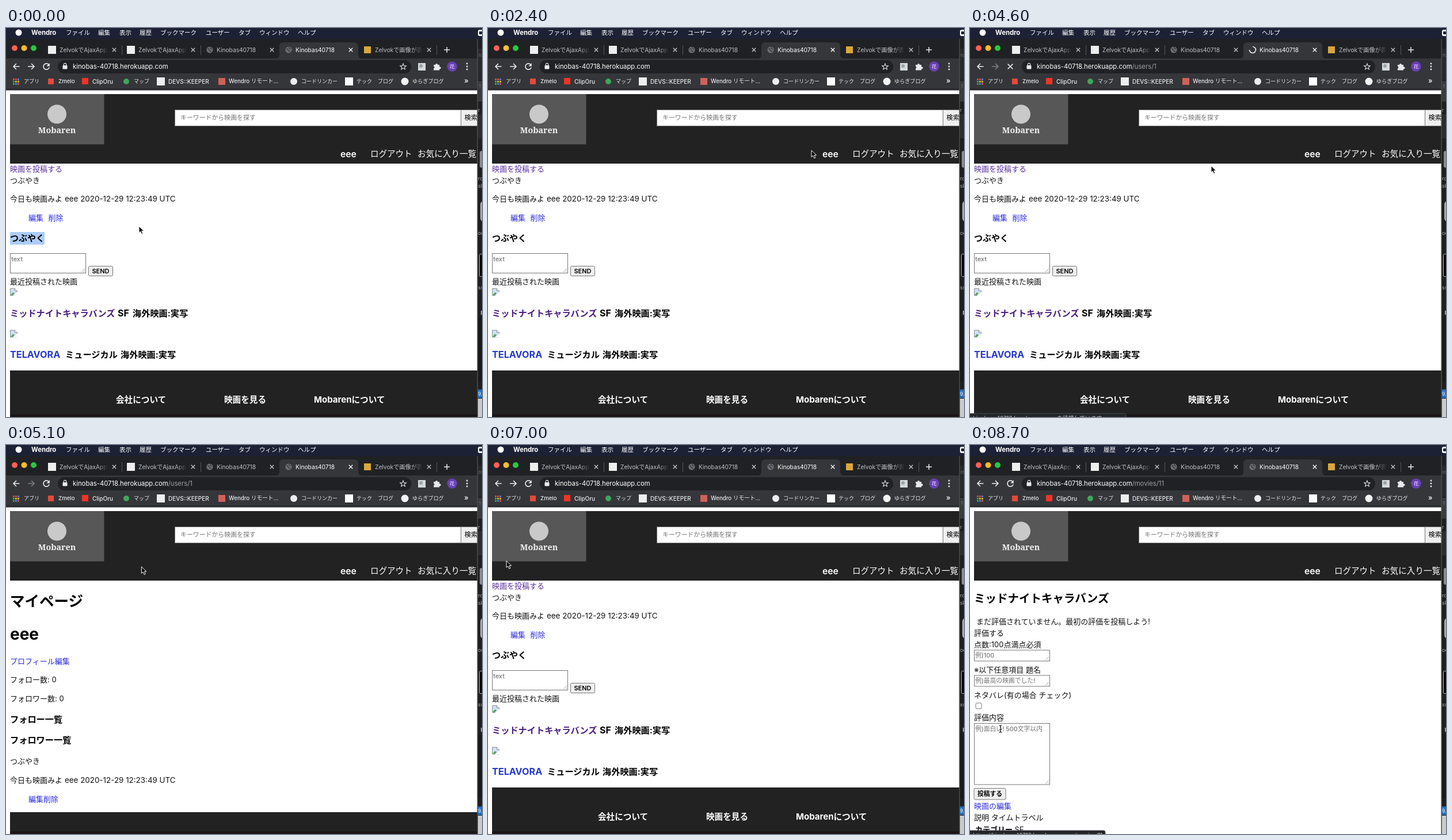
Recreate the animation shown at these times as an HTML page. Size 827 px wide and 677 px high, loop 8.8 s.

```html
<!DOCTYPE html>
<html lang="ja">
<head>
<meta charset="utf-8">
<title>Movie site</title>
<style>
html, body { margin: 0; width: 100%; height: 100%; overflow: hidden; background: #202124; }
svg { display: block; width: 827px; height: 677px; }
text { font-family: Inter, "Noto Sans CJK JP", "Noto Sans CJK", sans-serif; white-space: pre; }
.serif { font-family: "Noto Serif", serif; }
</style>
</head>
<body>
<svg id="stage" viewBox="0 0 827 677"></svg>
<script>
const LOOP = 8800, STEP = 100;
const BLUE = '#2b2bdc', PURPLE = '#5b2d9e', HEADING = '#4a1c80', BAR = '#222', GREY = '#757575';
const HOST = 'kinobas-40718.herokuapp.com';
const USER = 'eee', SITE = 'Mobaren', TAB = 'Kinobas40718', FILM = 'ミッドナイトキャラバンズ';

// cy is the optical middle of the line
const text = (x, cy, s, size = 13, fill = '#111', weight = 400, extra = '') =>
  `<text x="${x}" y="${(cy + size * .36).toFixed(2)}" font-size="${size}" fill="${fill}" font-weight="${weight}" ${extra}>${s}</text>`;
const bold = (x, cy, s, size = 15.2, fill = '#000') => text(x, cy, s, size, fill, 700);
const rect = (x, y, w, h, fill, extra = '') =>
  `<rect x="${x}" y="${y}" width="${w}" height="${h}" fill="${fill}" ${extra}/>`;
const circle = (x, y, r, fill, extra = '') => `<circle cx="${x}" cy="${y}" r="${r}" fill="${fill}" ${extra}/>`;
const line = (d, stroke, w = 1, extra = '') => `<path d="${d}" fill="none" stroke="${stroke}" stroke-width="${w}" ${extra}/>`;
const group = (id, body, extra = '') => `<g id="${id}" ${extra}>${body}</g>`;
const cross = (x, y, r, color, w = 1.3) =>
  line(`M${x - r} ${y - r}l${2 * r} ${2 * r}M${x + r} ${y - r}l${-2 * r} ${2 * r}`, color, w);
const box = (x, y, w, h, fill = '#fff', r = 0) =>
  rect(x + .5, y + .5, w - 1, h - 1, fill, `stroke="#767676" rx="${r}"`);
const textarea = (y, h, hint, size = 10.8) =>
  box(7, y, 132, h) + text(9, y + 10, hint, size, GREY, 500) +
  line(`M131 ${y + h - 2}l6 -6M135 ${y + h - 2}l2 -2`, '#888', .8);
const button = (x, y, w, h, label, size) => box(x, y, w, h, '#efefef', 2) +
  text(x + w / 2, y + h / 2, label, size, '#000', 600, 'text-anchor="middle"');

function menuBar() {
  const items = [[104, 'ファイル'], [160, '編集'], [197, '表示'], [232, '履歴'], [268, 'ブックマーク'],
    [347, 'ユーザー'], [404, 'タブ'], [440, 'ウィンドウ'], [507, 'ヘルプ']];
  return rect(0, 0, 827, 19, '#1c2136') + circle(22, 8, 5.5, '#fff') + bold(44, 8, 'Wendro', 11.3, '#fff') +
    items.map(([x, s]) => text(x, 8, s, 10.5, '#fff', 500)).join('') +
    rect(820, 3, 10, 11, '#fff', 'rx="3"') + rect(822, 6, 8, 5, '#1c2136', 'rx="1"');
}

function globe(x, y) {
  return circle(x, y, 5.6, '#6d7075') + line(`M${x - 4} ${y - 2}q3 0 3 2t4 3M${x + 1} ${y - 5}q-1 3 3 4`, '#35363a', 1.4);
}

function tabs() {
  const fade = (x, id) => rect(x, 28, 22, 20, `url(#${id})`);
  const title = (x, s) => text(x, 38, s, 10.2, '#bdc1c6');
  return rect(0, 18, 819, 36, '#202124') +
    ['#ff5f57', '#febc2e', '#28c840'].map((c, i) => circle(15 + i * 16.5, 35, 5, c)).join('') +
    '<path d="M469 53q6 0 6 -7v-14q0 -7 7 -7h123q7 0 7 7v14q0 7 6 7z" fill="#35363a"/>' +
    [73, 210].map(x => rect(x, 31, 14, 14, '#eee') + title(x + 20, 'ZelvokでAjaxApp') + fade(x + 85, 'fadeTab')).join('') +
    globe(354, 38) + title(366, TAB) + text(503, 38, TAB, 10.2, '#fff') +
    rect(622, 32, 12, 12, '#d9a83c') + title(641, 'Zelvokで画像が表示') + rect(726, 28, 20, 20, '#202124') + fade(704, 'fadeTab') +
    [188, 325, 462, 599, 735].map(x => cross(x, 38, 3.2, x === 599 ? '#fff' : '#c4c7cb')).join('') +
    [201, 338, 748].map(x => rect(x, 30, 1, 17, '#55575b')).join('') +
    line('M766 33v10M761 38h10', '#e8eaed', 1.5) +
    group('globe', globe(491, 38)) +
    group('spinner', line('M491 32.5A5.5 5.5 0 1 1 485.5 38', '#e8eaed', 1.7));
}

function toolbar() {
  const star = Array.from({ length: 10 }, (_, i) => {
    const r = i % 2 ? 2.4 : 5.6, a = i * Math.PI / 5;
    return `${(690 + r * Math.sin(a)).toFixed(1)},${(67.5 - r * Math.cos(a)).toFixed(1)}`;
  }).join(' ');
  return rect(0, 53, 819, 55, '#35363a') + rect(0, 105, 819, 3.5, '#2a2b2e') +
    line('M23.5 67H13M18 62l-5 5l5 5', '#e8eaed', 1.6) +
    group('forward', line('M38 67h10.5M44 62l5 5l-5 5', 'currentColor', 1.6)) +
    group('reload', line('M74 63.5A5.2 5.2 0 1 0 75.2 68.5', '#e8eaed', 1.6) + '<path d="M75.8 61v5.5h-5.5z" fill="#e8eaed"/>') +
    group('stop', cross(70, 67, 4.4, '#e8eaed', 1.5)) +
    rect(90, 56, 614, 23, '#202124', 'rx="11.5"') +
    rect(98.5, 65, 8, 6.5, '#e8eaed', 'rx="1"') + line('M100.3 65v-1.5a2.2 2.2 0 0 1 4.4 0v1.5', '#e8eaed', 1.2) +
    text(116, 67, `${HOST}<tspan id="path" fill="#9aa0a6"></tspan>`, 11.3, '#fff') +
    `<polygon points="${star}" fill="none" stroke="#dadce0" stroke-width="1.1"/>` +
    rect(716, 61, 13, 13, '#d5d9da') + circle(721, 66, 3, '#9aa3a6') +
    '<path d="M743 64h3a2 2 0 1 1 4 0h3v3.5a2 2 0 1 1 0 3.8v2.2h-10v-3a2 2 0 0 0 0 -3.8z" fill="#e8eaed"/>' +
    circle(775, 67, 8.7, '#6b3fb8') + text(775, 67, '花', 8.5, '#fff', 400, 'text-anchor="middle"') +
    [62, 67, 72].map(y => circle(801, y, 1.4, '#e8eaed')).join('');
}

function bookmarks() {
  const dots = ['#e8503f', '#e8503f', '#4a8af4', '#45a85a', '#f2b92c', '#f2b92c', '#45a85a', '#4a8af4', '#e8503f'];
  const labels = [[31, 'アプリ', 9], [91, 'Zmelo', 9.6], [150, 'ClipOru', 10], [222, 'マップ', 9],
    [282, 'DEVS::KEEPER', 10], [387, 'Wendro リモート...', 9.7], [513, 'コードリンカー', 9],
    [609, 'テック', 9], [646, 'ブログ', 9], [706, 'ゆらぎブログ', 9.1]];
  return rect(9, 83, 54, 20, '#46474b', 'id="appsHover" rx="10"') +
    dots.map((c, i) => rect(12 + i % 3 * 4, 88 + Math.floor(i / 3) * 4, 2.8, 2.8, c)).join('') +
    rect(73, 88, 10, 10, '#e5493c') + rect(132, 87, 11, 11, '#f03327') + circle(209, 93, 5, '#3fa65a') +
    rect(262, 86, 14, 14, '#eee') + rect(369, 87, 12, 12, '#cf6258') + circle(500, 93, 6, '#eceef0') +
    rect(589, 86, 14, 14, '#fff') + circle(693, 93, 6.5, '#f3f3f3') +
    labels.map(([x, s, size]) => text(x, 93, s, size, '#e8eaed', 500)).join('') +
    text(796, 92, '»', 12, '#e8eaed', 600);
}

function header() {
  return rect(7, 115, 812, 121, BAR) + rect(7, 115, 163.5, 87.5, '#575757') +
    circle(88.5, 150, 16.5, '#c9c9c9') +
    text(88.5, 177.5, SITE, 14.3, '#f2f2f2', 700, 'class="serif" text-anchor="middle"') +
    box(293, 142, 498, 29) + text(303, 156, 'キーワードから映画を探す', 10.9, GREY) +
    box(790, 142, 45, 29, '#efefef') + text(796.5, 156, '検索', 11.3, '#000', 500) +
    text(581, 219, USER, 15.7, '#fff', 600) + text(633, 218.5, 'ログアウト', 14.5, '#fff') +
    text(715, 218.5, 'お気に入り一覧', 14.6, '#fff');
}

const footer = y => rect(7, y, 812, 677 - y, BAR) + rect(7, 672.5, 812, 5, '#1a1517');
const tweet = y => text(7, y, '今日も映画みよ') + text(102, y, `${USER} 2020-12-29 12:23:49 UTC`, 13.4);
const brokenImage = y => `<g transform="translate(7 ${y})">` +
  '<path d="M.5 .5h8l4 4v8h-12z" fill="#cfe0f7" stroke="#8b8b8b"/>' +
  '<path d="M1 12l4 -5l3 2l-3 3z" fill="#4fa657"/><path d="M5 13l8 -7v7z" fill="#fff"/>' +
  '<path d="M8.5 .5v4h4" fill="#fff" stroke="#8b8b8b"/></g>';

function homePage() {
  const genre = (x, y) => bold(x, y, '海外映画:実写');
  return text(7, 245, '映画を投稿する', 13, PURPLE) + text(7, 265, 'つぶやき') + tweet(297.5) +
    text(39, 330, '編集', 13, BLUE) + text(73.5, 330, '削除', 13, BLUE) +
    rect(7, 355, 60, 22, '#accdf8', 'id="selection"') + bold(7, 365.5, 'つぶやく', 15) +
    textarea(392, 35, 'text', 11) + button(143, 414, 43, 18, 'SEND', 11) +
    text(7, 441, '最近投稿された映画') +
    brokenImage(453) + bold(7, 496.5, FILM, 15.2, HEADING) + bold(194, 496.5, 'SF', 16) + genre(220, 496.5) +
    brokenImage(525.5) + bold(7, 568.5, 'TELAVORA', 16.2, '#2439d0') + bold(103, 568.5, 'ミュージカル') + genre(199, 568.5) +
    footer(596) + bold(191, 646.5, '会社について', 14.6, '#fff') + bold(379, 646.5, '映画を見る', 14.6, '#fff') +
    bold(535, 646.5, SITE, 15, '#fff') + bold(600.5, 646.5, 'について', 14.6, '#fff');
}

function userPage() {
  return bold(7, 271.5, 'マイページ', 25.5) + bold(7, 329, USER, 28) +
    text(7, 376, 'プロフィール編集', 13, BLUE) + text(7, 408.5, 'フォロー数: 0') + text(7, 441, 'フォロワー数: 0') +
    bold(7, 477.5, 'フォロー一覧') + bold(7, 514, 'フォロワー一覧') + text(7, 550.5, 'つぶやき') + tweet(583) +
    text(39, 616, '編集削除', 13, BLUE) + footer(639);
}

function moviePage() {
  return bold(7, 266.5, FILM, 19.5) + text(11, 307.5, 'まだ評価されていません。最初の評価を投稿しよう!') +
    text(7, 327, '評価する') + text(7, 347, '点数:100点満点必須') + textarea(356.5, 20, '例)100') +
    text(7, 391, '※以下任意項目 題名') + textarea(400.5, 20, '例)最高の映画でした!') +
    text(7, 435, 'ネタバレ(有の場合 チェック)') + box(9.5, 448.5, 11, 11, '#fff', 2) +
    text(7, 474, '評価内容') + textarea(484, 107.5, '例)面白い! 500文字以内') +
    button(6.5, 597, 56, 20.5, '投稿する', 10.8) + text(7, 628, '映画の編集', 13, BLUE) +
    text(7, 648, '説明 タイムトラベル') + bold(9, 669, 'カテゴリー', 13) + text(77.5, 669, 'SF');
}

// Sliver of the windows behind the browser
function background() {
  const scraps = [[143, 'r'], [262, 'ro'], [275, 'sk'], [357, 'oo'], [452, 'ss']];
  return rect(819, 18, 8, 659, '#1f1f21') + rect(819, 36, 8, 54, '#292a2d') + rect(819, 92, 8, 36, '#3a3b3e') +
    rect(819, 150, 8, 42, '#2d2d30') + rect(819, 503, 8, 112, '#191a1c') +
    text(821, 47, 'ro', 8, '#777') + text(822, 101, '1', 7, '#888') +
    scraps.map(([y, s]) => text(820, y, s, 9, '#a8a8a8')).join('') +
    rect(823, 214, 10, 29, '#8b8b8d', 'rx="3"') + rect(824, 301, 12, 36, '#a9a9ab', 'rx="6"') +
    rect(822.5, 393.5, 10, 39, '#050505', 'stroke="#bbb" rx="2"') + rect(825, 492, 2, 7, '#999') +
    rect(819, 629, 8, 15, '#1f6fc4') + text(820, 637, '9.', 8.5, '#fff') +
    rect(819, 645, 8, 32, '#c9cacc') + rect(818.5, 18, 1.5, 659, '#4b4b4d');
}

const cursors = group('arrow', '<path d="M0 0v11.5l2.7 -2.5l2 4.6l2.1 -.9l-2 -4.5h3.7z" fill="#000" stroke="#fff" stroke-width="1"/>') +
  group('hand', '<path d="M-1 0q1.3 -1.2 2.2 .3v4.3q1.5 -.9 2.2 .4q1.5 -.7 2.1 .5q1.8 -.5 1.8 1.3v3.2l-1.5 3.5h-6l-4 -5.3q-.3 -1.7 1.5 -1l1.7 1.5z" fill="#fff" stroke="#111" stroke-width="1.1"/>' +
    line('M1.7 8v3M3.7 8v3', '#111', .8)) +
  group('beam', line('M-2.5 -6q2.5 0 2.5 1.5v9q0 1.5 -2.5 1.5M2.5 -6q-2.5 0 -2.5 1.5M2.5 6q-2.5 0 -2.5 -1.5M-1.5 1.5h3', '#111', 1.2));

const stage = document.getElementById('stage');
stage.innerHTML =
  '<defs><linearGradient id="fadeTab"><stop stop-color="#202124" stop-opacity="0"/><stop offset=".9" stop-color="#202124"/></linearGradient>' +
  '<clipPath id="window"><rect y="18" width="819" height="659"/></clipPath></defs>' +
  '<g clip-path="url(#window)">' + rect(0, 108, 819, 569, '#fff') + header() +
  group('home', homePage()) + group('user', userPage()) + group('movie', moviePage()) +
  tabs() + toolbar() + bookmarks() + '</g>' + background() + menuBar() +
  group('status', rect(-4, 671, 239, 20, '#232427', 'id="statusBox" rx="3" stroke="#4b4c50"') +
    text(5, 679.5, '<tspan id="statusText"></tspan>', 9.8, '#c8cacd')) +
  group('cursor', cursors);

const $ = id => document.getElementById(id);
const show = (id, on) => { $(id).style.display = on ? '' : 'none'; };
const within = (t, from, to) => t >= from && t < to;

// Pointer stops: time, x, y
const route = [[0, 231, 345], [600, 199, 335], [1400, 199, 335], [2400, 562, 213], [2800, 592, 220],
  [4200, 592, 220], [4600, 419, 240], [5300, 190, 205], [6100, 53, 51], [6400, 19, 65],
  [6700, 19, 65], [7500, 60, 497], [8300, 60, 497], [8700, 53, 494]];

function pointer(t) {
  const i = route.findIndex(stop => stop[0] > t);
  if (i < 0) return route[route.length - 1].slice(1);
  const [t0, x0, y0] = route[i - 1], [t1, x1, y1] = route[i];
  const u = (t - t0) / (t1 - t0), e = u * u * (3 - 2 * u);
  return [x0 + (x1 - x0) * e, y0 + (y1 - y0) * e];
}

function draw(t) {
  const page = within(t, 4900, 6600) ? 'user' : t >= 8500 ? 'movie' : 'home';
  ['home', 'user', 'movie'].forEach(id => show(id, id === page));
  show('selection', t < 700);

  const loading = within(t, 4200, 4900) || within(t, 8300, 8500);
  show('spinner', loading);
  show('globe', !loading);
  show('stop', loading);
  show('reload', !loading);
  $('spinner').setAttribute('transform', `rotate(${(t - 4600) * .36} 491 38)`);

  const onUser = within(t, 4300, 6600);
  $('path').textContent = onUser ? '/users/1' : t >= 8400 ? '/movies/11' : '';
  $('forward').style.color = onUser ? '#7d8085' : '#e8eaed';
  show('appsHover', within(t, 5900, 6300));

  const waiting = within(t, 4300, 4900);
  show('status', within(t, 3000, 4900) || t >= 8200);
  $('statusBox').setAttribute('width', waiting ? 275 : 239);
  $('statusText').textContent = waiting ? `${HOST} を待機しています...` :
    `https://${HOST}${t < 5000 ? '/users/1' : '/movies/11'}`;

  const hand = within(t, 2700, 4300) || within(t, 7400, 8500), beam = t >= 8500;
  show('hand', hand);
  show('beam', beam);
  show('arrow', !hand && !beam);
  $('cursor').setAttribute('transform', `translate(${pointer(t).map(v => v.toFixed(1))})`);
}

const start = performance.now();
function tick() {
  const t = (performance.now() - start) % LOOP;
  draw(Math.floor(t / STEP) * STEP);
  requestAnimationFrame(tick);
}
tick();
</script>
</body>
</html>
```
